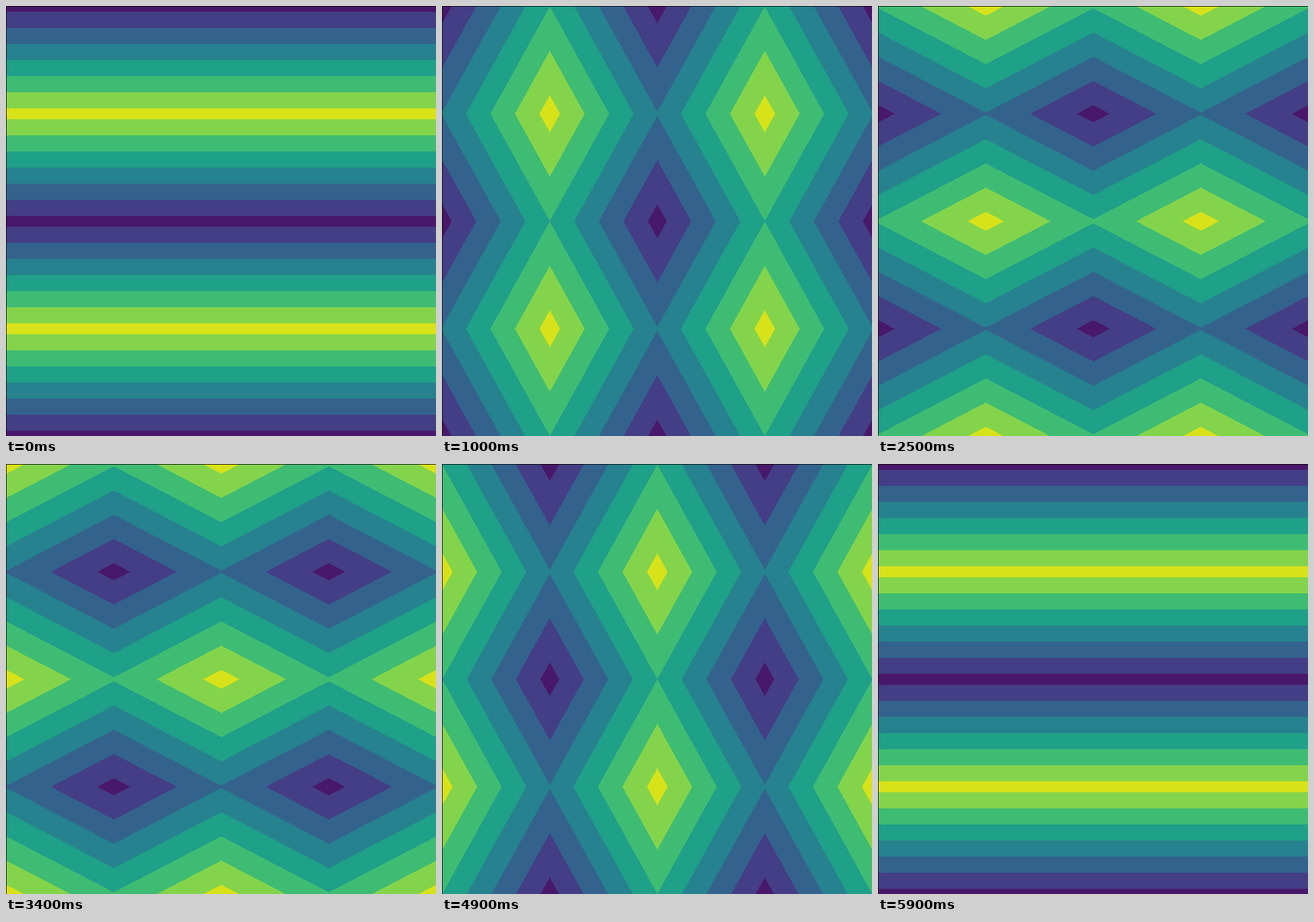
Animation, 748 px wide and 748 px high, one loop 6 s. Source, as an HTML page with a canvas:

```html
<!DOCTYPE html>
<html lang="en">
<head>
<meta charset="utf-8">
<title>Triangle wave contours</title>
<style>
  html, body { margin: 0; width: 100%; height: 100%; overflow: hidden; background: #000; }
  canvas { display: block; }
</style>
</head>
<body>
<canvas id="stage" width="748" height="748"></canvas>
<script>
const SIZE = 748, PERIOD = 374, ORIGIN = 0.5;
const STEPS = 60, STEP_MS = 100;
const PALETTE = [0x48186a, 0x433e85, 0x33638d, 0x26828e, 0x1fa088, 0x3fbc73, 0x84d44b, 0xd8e219];

const ctx = document.getElementById('stage').getContext('2d');
const image = ctx.createImageData(SIZE, SIZE);
const pixels = new DataView(image.data.buffer);
const colors = PALETTE.map(rgb => ((rgb << 8) | 0xff) >>> 0);

// Triangle wave sampled at pixel centres: -1 at the origin, +1 half a period later
const wave = Float64Array.from({ length: SIZE }, (_, i) => {
  const p = ((i + 0.5 - ORIGIN) / PERIOD) % 1;
  return 1 - 4 * Math.abs(p - 0.5);
});

function draw(step) {
  const angle = 2 * Math.PI * step / (STEPS - 1);
  const a = Math.sin(angle), b = Math.cos(angle);
  const peak = Math.abs(a) + Math.abs(b);
  const gap = peak > 1.2 ? 0.4 : 0.3;
  // Slanted bands take every pixel they touch; level ones snap to whole pixels
  const spread = Math.abs(a) < 1e-9 ? 0 : 2 * peak / PERIOD;

  for (let y = 0; y < SIZE; y++) {
    const base = b * wave[y] + spread;
    for (let x = 0; x < SIZE; x++) {
      const band = Math.floor((a * wave[x] + base) / gap) + 4;
      const color = x && y ? colors[Math.max(0, Math.min(7, band))] : 0x000000ff;
      pixels.setUint32(4 * (y * SIZE + x), color);
    }
  }
  ctx.putImageData(image, 0, 0);
}

const start = performance.now();
let shown = -1;

function tick() {
  const step = Math.floor((performance.now() - start) / STEP_MS) % STEPS;
  if (step !== shown) draw(shown = step);
  requestAnimationFrame(tick);
}
tick();
</script>
</body>
</html>
```
